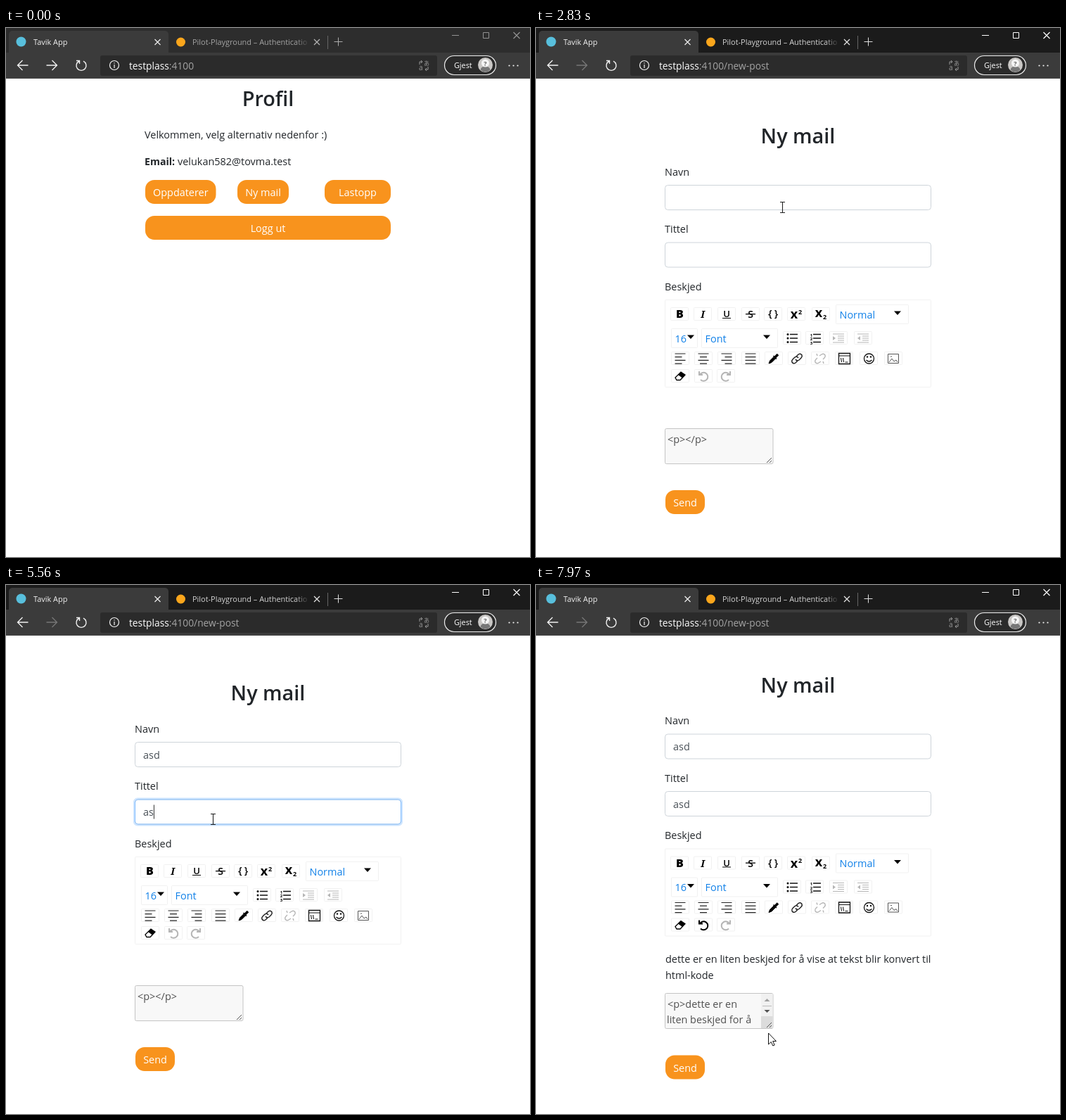
Write an HTML page with a canvas that moves like this. It is 745 px wide and 752 px high and loops after 8000 ms.

```html
<!DOCTYPE html>
<html lang="no">
<head>
<meta charset="utf-8">
<title>Ny mail</title>
<style>
html, body { margin: 0; width: 100%; height: 100%; overflow: hidden; background: #fff; }
canvas { display: block; width: 745px; height: 752px; }
</style>
</head>
<body>
<canvas id="stage" width="745" height="752"></canvas>
<script>
const ctx = document.getElementById('stage').getContext('2d');
const LOOP = 8000;
const FONT = '"Open Sans", "Noto Sans", sans-serif';
const ORANGE = '#f8931d', INK = '#212529', BLUE = '#1080e8';
const HOST = 'testplass', PORT = ':4100', ROUTE = '/new-post';

// Moments of the story, in ms
const ACTIVE = 1790, ROUTED = 1870, PAGE = 2000, PASTE = 7130;
const CLICKS = [[1640, 1800], [3040, 3230], [4640, 4960], [6390, 6560]];
const PATH = [
  [230, 660, 699], [310, 520, 580], [390, 414, 491], [620, 414, 491],
  [1390, 357, 238], [1630, 364, 229], [1800, 364, 229], [1870, 366, 230],
  [2650, 366, 230], [2830, 350, 255], [3000, 335, 246], [3440, 335, 246],
  [3670, 325, 283], [4480, 325, 283], [4640, 294, 319], [5240, 294, 319],
  [5310, 294, 333], [5650, 294, 333], [5720, 284, 360], [5950, 276, 593],
  [6220, 273, 536], [6400, 273, 536], [6700, 258, 537], [7590, 258, 537],
  [7780, 352, 600], [7970, 330, 637]
];

const clamp = v => Math.max(0, Math.min(1, v));
const within = (t, a, b) => t >= a && t < b;

function text(s, x, y, o = {}) {
  ctx.font = `${o.style || ''} ${o.weight || 400} ${o.size || 14.45}px ${o.font || FONT}`;
  ctx.textAlign = o.align || 'left';
  ctx.fillStyle = o.color || INK;
  ctx.fillText(s, x, y);
  return ctx.measureText(s).width;
}

function heading(s, y) {
  text(s, 372.5, y, { size: 28.8, weight: 600, align: 'center' });
}

function box(x, y, w, h, r, fill, stroke, lw = 1) {
  ctx.beginPath();
  ctx.roundRect(x, y, w, h, r);
  if (fill) { ctx.fillStyle = fill; ctx.fill(); }
  if (stroke) { ctx.strokeStyle = stroke; ctx.lineWidth = lw; ctx.stroke(); }
}

function dot(x, y, r, color) {
  ctx.beginPath();
  ctx.arc(x, y, r, 0, 7);
  ctx.fillStyle = color;
  ctx.fill();
}

function shape(x, y, d, stroke, lw = 1.2, fill) {
  const p = new Path2D(d);
  ctx.save();
  ctx.translate(x, y);
  if (fill) { ctx.fillStyle = fill; ctx.fill(p); }
  if (stroke) { ctx.strokeStyle = stroke; ctx.lineWidth = lw; ctx.stroke(p); }
  ctx.restore();
}

function cross(x, y, r, color) {
  shape(x, y, `M${-r} ${-r}L${r} ${r}M${r} ${-r}L${-r} ${r}`, color, 1.2);
}

function button(label, x, y, w, focus) {
  if (focus) {
    box(x - 3, y - 3, w + 6, 40, 15, '#aed1fa');
    box(x - 1, y - 1, w + 2, 36, 13, '#fff');
  }
  box(x, y, w, 34, 13, ORANGE);
  text(label, x + w / 2, y + 23, { color: '#fff', align: 'center' });
}

function browser(t) {
  const on = t >= ACTIVE, routed = t >= ROUTED;
  const lit = '#f2f2f2', frame = on ? '#fff' : '#929292';
  box(0, 0, 745, 36, 0, on ? '#1b1b1b' : '#2d2d2d');
  box(4, 4, 227, 40, [5, 5, 0, 0], '#3b3b3b');
  box(0, 35, 745, 37, 0, '#3b3b3b');
  box(0, 71, 745, 1, 0, '#4b4b4b');

  dot(21.5, 19.5, 7, '#58bfdc');
  text('Tavik App', 39, 24, { size: 10.95, color: '#f0f0f0' });
  cross(215.5, 20, 4, '#eee');
  dot(248.5, 20, 6.5, '#fba61c');
  const fade = ctx.createLinearGradient(412, 0, 430, 0);
  fade.addColorStop(0, on ? '#d4d4d4' : '#a3a3a3');
  fade.addColorStop(1, 'rgba(160,160,160,.15)');
  ctx.save();
  ctx.beginPath();
  ctx.rect(260, 5, 168, 28);
  ctx.clip();
  text('Pilot-Playground – Authentication', 265, 24, { size: 10.95, color: fade });
  ctx.restore();
  cross(442, 20, 4, on ? '#e5e5e5' : '#b5b5b5');
  box(457, 11, 1, 19, 0, '#666');
  shape(472.5, 19.5, 'M-6 0H6M0 -6V6', on ? '#ddd' : '#aaa', 1);

  box(634, 10, 10, 1, 0, frame);
  box(678.5, 6.5, 8, 8, 0, null, frame);
  cross(726, 10.5, 4.5, frame);

  shape(23.5, 53, 'M8 0H-7M0 -7L-7 0L0 7', lit, 1.3);
  shape(65.5, 53, 'M-8 0H7M0 -7L7 0L0 7', routed ? '#777' : lit, 1.3);
  shape(107, 53.5, 'M-3 -6.4A7 7 0 1 0 3 -6.4M-7 -7H-2.5V-2.5', lit, 1.4);
  box(134, 39, 479, 29, 3, '#2b2b2b');
  shape(154, 53, 'M6.5 0A6.5 6.5 0 1 1 -6.5 0A6.5 6.5 0 1 1 6.5 0M0 -1V4M0 -3.8V-2.4', lit, 1.2);
  const w = text(HOST, 175, 58.5, { size: 13.8, color: '#fff' });
  text(PORT + (routed ? ROUTE : ''), 175 + w, 58.5, { size: 13.8, color: '#a4a4a4' });
  text('あ', 594, 53, { size: 8, color: '#999', font: '"Noto Sans CJK JP", sans-serif' });
  text('a', 587, 60, { size: 10, color: '#999' });
  shape(594, 53, 'M-6 -1V-5H-2M-4 -7L-2 -5L-4 -3M6 2V6H2M4 4L2 6L4 8', '#999', 1);

  box(623.5, 39.5, 73, 27, 14, '#2b2b2b', '#eee', 1.2);
  text('Gjest', 637, 57, { size: 10.8, color: '#fff' });
  dot(681.5, 52.5, 10.5, '#c9c7c5');
  shape(681.5, 52.5, 'M-7 7Q-6 2 0 2Q6 2 7 7Q0 13 -7 7', null, 1, '#777');
  dot(681.5, 50, 5.5, '#f5f5f5');
  text('?', 681.5, 53.5, { size: 9, weight: 700, align: 'center', color: '#666' });
  for (const x of [715.5, 721.5, 727.5]) dot(x, 53.5, 1.1, lit);
}

function profile(t) {
  heading('Profil', 111);
  text('Velkommen, velg alternativ nedenfor :)', 197, 157);
  text('Email:', 197, 195, { size: 14.2, weight: 700 });
  text('velukan582@tovma.test', 244, 195);
  button('Oppdaterer', 198, 216, 100.5);
  button('Ny mail', 329, 216, 73, t >= ACTIVE);
  button('Lastopp', 453, 216, 94);
  button('Logg ut', 198, 267, 349);
}

function field(label, y, value, glow, caret) {
  text(label, 183, y - 13.5);
  if (glow > 0) box(182, y - 1, 381, 38, 5, null, `rgba(0,123,255,${0.2 * glow})`, 2);
  box(183.5, y + 0.5, 378, 35, 4, '#fff', '#ced4da');
  if (glow > 0) box(183.5, y + 0.5, 378, 35, 4, null, `rgba(128,189,255,${glow})`);
  const w = text(value, 195, y + 23.5, { color: '#495057' });
  if (caret) box(195 + w, y + 8, 1, 20, 0, '#333');
}

function glyph(s, x, y, o = {}) {
  text(s, x, y + 5, { size: 14, weight: 700, align: 'center', color: '#000', ...o });
}

function select(label, x, y, w, tip) {
  box(x + 0.5, y - 13.5, w, 27, 1, '#fff', '#f1f1f1');
  text(label, x + 5.5, y + 5.5, { color: BLUE });
  shape(tip, y - 2, 'M-5 -2.5H5L0 3Z', null, 1, '#000');
}

function lines(x, y, shift) {
  let d = '';
  for (let i = 0; i < 4; i++) {
    const len = i % 2 && shift !== null ? 10 : 15;
    d += `M${-7.5 + (15 - len) * (shift || 0)} ${-7 + i * 4.7}h${len}`;
  }
  shape(x, y, d, '#222', 1.2);
}

function toolbar(pasted) {
  const dim = '#b5b5b5';
  box(183.5, 386.5, 378, 124, 1, '#fff', '#f1f1f1');
  const rows = [
    [407, [204, 237, 271, 305, 337, 370, 405]],
    [441, [364, 396, 430, 465]],
    [470, [205, 238, 271, 305, 338, 371, 404, 438, 473, 508]],
    [495, [205, 238, 270]]
  ];
  for (const [y, xs] of rows) {
    for (const x of xs) box(x - 12.5, y - 9.5, 25, 18, 1, '#fff', '#f1f1f1');
  }
  glyph('B', 204.5, 407, { weight: 800, size: 16 });
  glyph('I', 237, 407, { style: 'italic', font: '"Noto Serif", serif' });
  glyph('U', 271, 406, { size: 13, weight: 600 });
  box(265, 412, 12, 1, 0, '#000');
  glyph('S', 305, 407, { weight: 600 });
  box(298, 406, 14, 1.3, 0, '#000');
  glyph('{ }', 337, 406, { weight: 600 });
  glyph('x', 367, 408, { size: 18 });
  glyph('2', 375.5, 401.5, { size: 9 });
  glyph('x', 402, 406, { size: 18 });
  glyph('2', 410.5, 409, { size: 9 });
  select('Normal', 426, 407, 103, 514);
  select('16', 192, 441, 37, 220);
  select('Font', 235, 441, 108, 328);

  for (let i = -1; i < 2; i++) {
    dot(358, 441 + i * 5.5, 1.5, '#111');
    glyph(String(i + 2), 391.5, 439 + i * 5.5, { size: 6 });
  }
  for (const x of [364, 397]) shape(x, 441, 'M-3 -5.5H8M-3 0H8M-3 5.5H8', '#111', 1.3);
  for (const [x, d] of [[430, 'M-8 -3L-4 0L-8 3Z'], [465, 'M-4 -3L-8 0L-4 3Z']]) {
    shape(x, 441, 'M-8 -6H8M-1 -3H8M-1 0H8M-1 3H8M-8 6H8', dim, 1);
    shape(x, 441, d, null, 1, dim);
  }

  lines(205, 470, 0);
  lines(238, 470, 0.5);
  lines(271, 470, 1);
  lines(305, 470, null);
  shape(338, 470, 'M-7 7L-5.5 3L0 -2.5L2.5 0L-3 5.5Z', '#000', 1, '#000');
  shape(338, 470, 'M-0.5 -4L4 0.5', '#000', 1.5);
  shape(338, 470, 'M2 -2L6 -6', '#000', 3.5);
  const link = 'M-1 -3L2 -6Q5 -8 7 -5Q8 -3 6 -1L3 2Q0 4 -2 1M1 3L-2 6Q-5 8 -7 5Q-8 3 -6 1L-3 -2Q0 -4 2 -1';
  shape(371, 470, link, '#222', 1.5);
  shape(404, 470, 'M-1 -4L2 -6Q5 -8 7 -5Q8 -3 6 -1L4 1M1 4L-2 6Q-5 8 -7 5Q-8 3 -6 1L-4 -1M-5 -7L-4 -4M5 7L4 4', dim, 1.4);
  box(430.5, 462.5, 16, 15, 0, null, '#111', 1.3);
  shape(438.5, 470, 'M-8 -4H8M-5 -1L-4 5M-2 -1L-1 5M1 5H5', '#111', 1.1);
  shape(473.5, 470, 'M7 0A7 7 0 1 1 -7 0A7 7 0 1 1 7 0M-4 2Q0 6 4 2', '#111', 1.3);
  dot(471, 467.5, 1.2, '#111');
  dot(476, 467.5, 1.2, '#111');
  box(500.5, 463.5, 15, 13, 0, null, '#555');
  shape(508, 470, 'M-6 5L-2 0L1 4L4 2L6 5M-4 -3H-2', '#555', 1);

  shape(205, 495, 'M-7 2L1 -6L7 -2L0 5.5H-5Z', '#000', 1.3, '#fff');
  shape(205, 495, 'M-3 -2L1 -6L7 -2L3 2.5Z', null, 1, '#000');
  const turn = 'M-5 -2A6 6 0 1 1 -4 5M-6 -7V-2H-1';
  shape(238, 495, turn, pasted ? '#000' : dim, 2);
  ctx.save();
  ctx.translate(270, 495);
  ctx.scale(-1, 1);
  shape(0, 0, turn, dim, 2);
  ctx.restore();
}

function source(pasted) {
  const o = { color: '#505050' };
  box(183.5, 569.5, 153.5, 50, 2, '#f8f8f8', '#c4c4c4');
  text(pasted ? '<p>dette er en' : '<p></p>', 187, 589.5, o);
  if (pasted) {
    text('liten beskjed for å', 186, 612, o);
    box(320, 570, 16.5, 49, 0, '#f1f1f1');
    box(320, 602, 16.5, 17, 0, '#dcdcdc');
    box(322, 587, 13, 1, 0, '#bbb');
    shape(328.5, 579, 'M-4 2H4L0 -2Z', null, 1, '#a0a0a0');
    shape(328.5, 595, 'M-4 -2H4L0 2Z', null, 1, '#505050');
  }
  shape(336, 619, 'M-8 -1L-1 -8M-4 -1L-1 -4', '#555', 1);
}

function glow(t, on, off) {
  return Math.min(clamp((t - on) / 150), 1 - clamp((t - off) / 150));
}

const typed = (t, times) => 'asd'.slice(0, times.filter(at => t >= at).length);

function mail(t) {
  const pasted = t >= PASTE;
  ctx.save();
  if (pasted) ctx.translate(0, -11.5);
  heading('Ny mail', 164);
  field('Navn', 223, typed(t, [4160, 4310, 4390]), glow(t, 3060, 4680),
    within(t, 3060, 3600) || within(t, 4160, 4640));
  field('Tittel', 304.5, typed(t, [5480, 5560, 5640]), glow(t, 4640, 6330),
    within(t, 4640, 5090) || within(t, 5480, 6140));
  text('Beskjed', 183, 372.5);
  toolbar(pasted);
  ctx.restore();

  if (within(t, 6260, 6830)) box(184, 532, 1, 20, 0, '#111');
  if (pasted) {
    text('dette er en liten beskjed for å vise at tekst blir konvert til', 184, 536.5);
    text('html-kode', 184, 559.5);
  }
  ctx.save();
  if (pasted) ctx.translate(0, 11);
  source(pasted);
  button('Send', 184, pasted ? 657.5 : 657, 56);
  ctx.restore();
}

function status(t) {
  if (t < ROUTED || t > 2420) return;
  ctx.globalAlpha = 1 - clamp((t - 2250) / 170);
  box(0, 733, 245.5, 20, [0, 4, 0, 0], '#3b3b3b');
  text(HOST + PORT + ROUTE, 2, 747, { size: 10.3, color: '#b9b9b9' });
  ctx.globalAlpha = 1;
}

function place(t) {
  const i = PATH.findIndex(k => k[0] > t);
  if (i < 0) return PATH[PATH.length - 1].slice(1);
  const [t0, x0, y0] = PATH[i - 1], [t1, x1, y1] = PATH[i];
  const p = (t - t0) / (t1 - t0);
  return [x0 + (x1 - x0) * p, y0 + (y1 - y0) * p];
}

function pointerKind(t, x, y) {
  const inside = (l, top, r, b) => x > l && x < r && y > top && y < b;
  if (t < PAGE) {
    if (t >= ROUTED) return 'beam';
    return inside(329, 216, 402, 250) || inside(198, 267, 547, 301) ? 'hand' : 'arrow';
  }
  const editable = inside(183, 223, 562, 259) || inside(183, 304, 562, 341) ||
    inside(183, 515, 562, 562) || inside(183, 569, 337, 620);
  return editable || t < 2830 ? 'beam' : 'arrow';
}

function pointer(t) {
  if (t < 230 || within(t, 3840, 4480)) return;
  const [x, y] = place(t);
  if (CLICKS.some(c => within(t, ...c))) dot(x - 1.5, y - 0.5, 11.5, 'rgba(255,250,0,.58)');
  const kind = pointerKind(t, x, y);
  if (kind === 'beam') {
    shape(Math.round(x) + 0.5, Math.round(y), 'M-3.5 -7.5H3.5M0 -7.5V7.5M-3.5 7.5H3.5', '#222', 1.1);
  } else if (kind === 'hand') {
    shape(x, y, 'M-2 1.5Q0 -1 2 1.5V6L8 8Q10 8.5 9.5 11.5L8 20H-1L-6 12Q-6 9 -4 10L-2 12Z', '#111', 1.1, '#fff');
    shape(x, y, 'M2 6V11M4.7 7.5V11M7.2 8.5V11', '#111', 0.9);
  } else {
    shape(x + 0.5, y, 'M0 0V16L3.8 12.5L6.3 18L8.7 17L6.2 11.5H11Z', '#111', 1, '#fff');
  }
}

function draw(now) {
  const t = now % LOOP;
  box(0, 0, 745, 752, 0, '#fff');
  if (t < PAGE) profile(t); else mail(t);
  browser(t);
  status(t);
  pointer(t);
}

let start;
function tick(now) {
  start ??= now;
  draw(now - start);
  requestAnimationFrame(tick);
}
draw(0);
requestAnimationFrame(tick);
</script>
</body>
</html>
```
